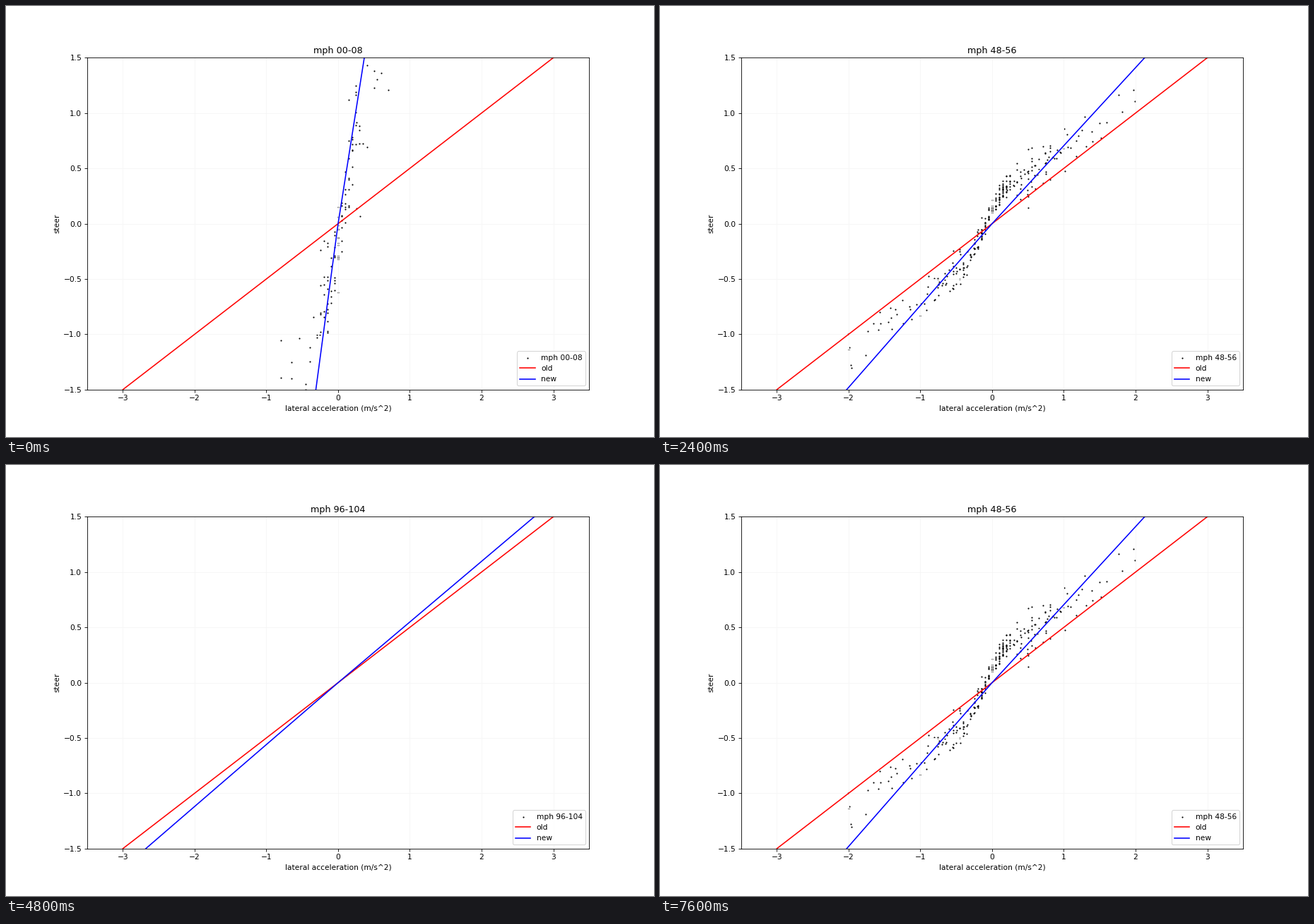
Write a matplotlib script that moves like this. It is 917 px wide and 611 px high and loops after 8000 ms.

```python
import numpy as np
import matplotlib.pyplot as plt
from matplotlib.animation import FuncAnimation

LAST = 12          # highest speed band, each 8 mph wide
FRAMES = 20

# Where the fitted line meets the lower and upper edge, as cubics of the band
KEYS = [0, 4, 8, 12]
low_x = np.poly1d(np.polyfit(KEYS, [-.31, -1.605, -2.33, -2.68], 3))
high_x = np.poly1d(np.polyfit(KEYS, [.365, 1.71, 2.415, 2.735], 3))


def steer(x, band):
    """Centre of the cloud: a line, a friction step and a bump around zero."""
    slope = .45 + .95 * np.exp(-band / 1.2)
    step = max(.55 - .055 * band, .1)
    bump = .17 * np.cos((band - 4.5) * np.pi / 7.4)
    return slope * x + step * np.tanh(x / .25) + bump * np.exp(-(x / .35) ** 2)


def samples(band):
    rng = np.random.default_rng(band + 1)
    if band == LAST:
        return np.empty(0), np.empty(0)
    if band == LAST - 1:
        # only a handful of readings, all in one sweep to the left
        x = np.linspace(.05, -.8, 14)
        return x, -.14 - .3 * np.abs(x) - .6 * x ** 2 + rng.normal(0, .04, x.size)

    count = int(330 - 215 * np.exp(-band / 4))
    width = .22 + .055 * band
    x = rng.laplace(0, width, count)
    x = np.round(np.clip(x, -3.6 * width, 3.6 * width) / .05) * .05

    near = .03 + .2 * np.exp(-band)
    far = .05 + .28 * np.exp(-band / 4)
    spread = near + (far - near) * np.minimum(np.abs(x) / .5, 1)
    y = steer(x, band) + spread * rng.normal(size=count)
    return x + .01 * x * rng.normal(size=count), y


POINTS = [samples(b) for b in range(LAST + 1)]

fig, ax = plt.subplots(figsize=(12.00655, 8), dpi=76.375)


def draw(i):
    band = i if i <= LAST else 2 * LAST + 1 - i
    name = f"mph {8 * band:02d}-{8 * band + 8:02d}"
    ax.clear()
    ax.scatter(*POINTS[band], s=1, color="black", label=name)
    ax.plot([-3, 3], [-1.5, 1.5], color="red", label="old")
    ax.plot([low_x(band), 0, high_x(band)], [-1.5, 0, 1.5], color="blue", label="new")
    ax.set(xlim=(-3.5, 3.5), ylim=(-1.5, 1.5), title=name,
           xlabel="lateral acceleration (m/s^2)", ylabel="steer")
    ax.grid(color="whitesmoke")
    ax.legend(loc="lower right")
    return []


anim = FuncAnimation(fig, draw, frames=FRAMES, interval=400, repeat=True, repeat_delay=0)
plt.show()
```
